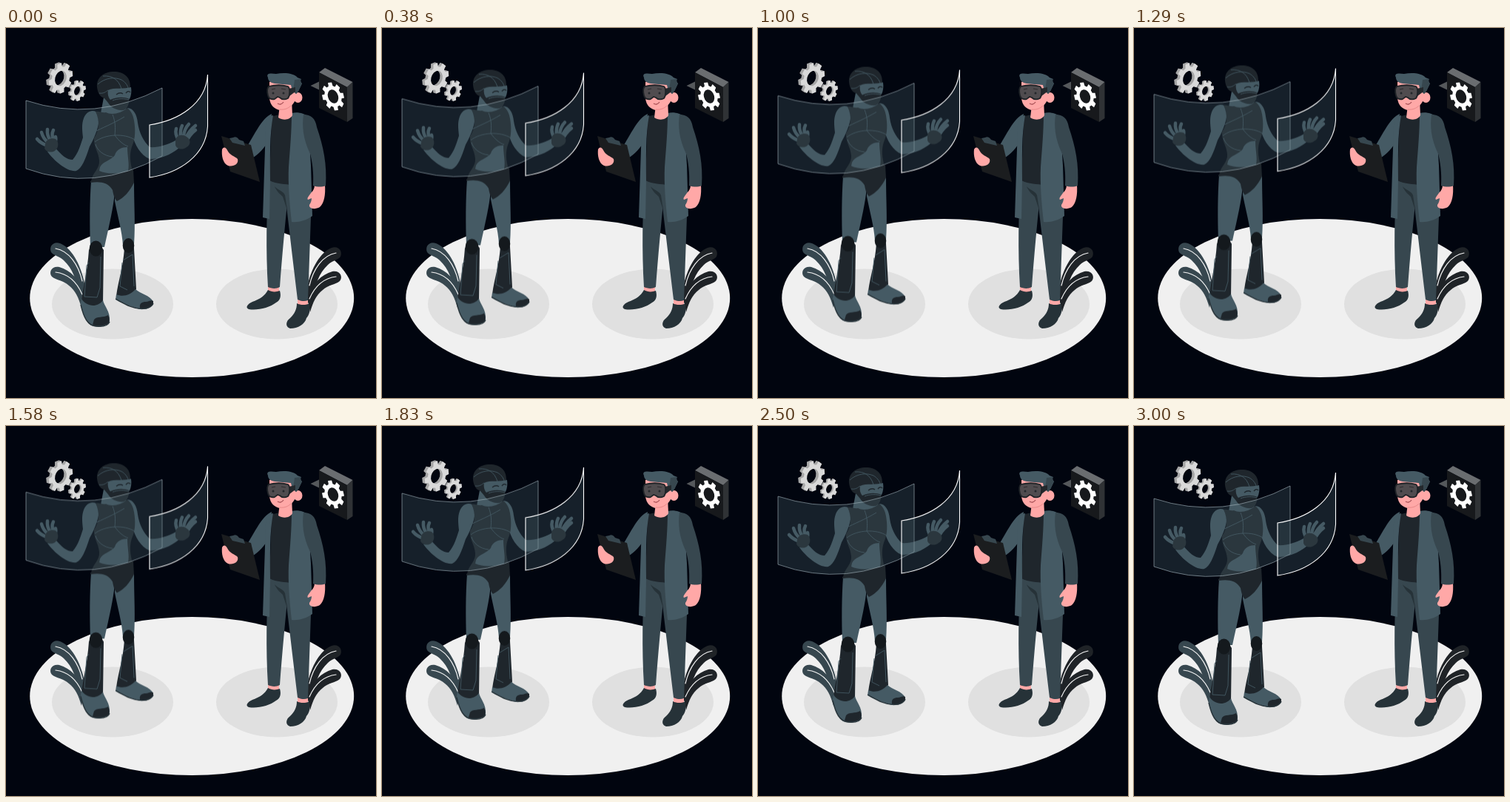
An HTML page for the animation above (3040 ms loop, 500 px wide and 500 px high).

```html
<!DOCTYPE html>
<html lang="en">
<head>
<meta charset="utf-8">
<title>Floating robot and engineer</title>
<style>
html,body{margin:0;width:100%;height:100%;overflow:hidden;background:#01050f}
svg{display:block;width:100vw;height:100vh}
.slate{fill:#455a64}
.steel{fill:#37474f}
.dark{fill:#1f262c}
.ink{fill:#14191d}
.shoe{fill:#263238}
.skin{fill:#ffa8a7}
.line{fill:none;stroke:#455a64;stroke-width:.9;stroke-linejoin:round}
.vein{fill:none;stroke:#f4f4f4;stroke-width:1.2;stroke-linecap:round}
.finger{fill:none;stroke:#455a64;stroke-width:4.5;stroke-linecap:round}
.sole{fill:none;stroke:#263238;stroke-width:1.4}
.glass{fill:#455a64;fill-opacity:.32}
</style>
</head>
<body>
<svg viewBox="0 0 500 500" xmlns="http://www.w3.org/2000/svg">
<defs>
  <g id="plant">
    <path d="M106 345C101 318 87 296 73 291C63 288 58 296 61 303C65 308 72 308 78 314C90 325 96 342 99 362L106 366Z"/>
    <path d="M106 358C99 340 87 327 72 323C62 321 57 330 62 336C68 341 78 341 85 348C94 355 98 364 102 378Z"/>
    <path class="vein" d="M67 298C85 301 98 320 103 342M67 330C84 332 96 344 103 360"/>
  </g>
</defs>

<ellipse cx="251.200" cy="365" rx="219" ry="107" fill="#f0f0f0"/>
<g fill="#e0e0e0">
  <ellipse cx="144" cy="373" rx="82" ry="47.5"/>
  <ellipse cx="366" cy="373" rx="82" ry="47.5"/>
</g>
<use href="#plant" fill="#37474f"/>
<use href="#plant" fill="#1f2327" transform="matrix(-1 0 0 1 513 6)"/>

<g id="gears"></g>

<!-- gear sign -->
<path fill="#55585b" d="M411.500 78L424 72V84Z"/>
<path fill="#6a6d70" d="M423 60L431 54L468.500 73L461 80Z"/>
<path fill="#2f3235" d="M461 80L468.500 73V122L461 127Z"/>
<path fill="#17191c" d="M423 60L461 80V127L423 108Z"/>
<g id="sign"></g>

<!-- engineer -->
<g>
  <path class="skin" d="M354 347H369V356C364 359 358 358 354 355ZM394 365H408V374C403 376 398 375 394 373Z"/>
  <path class="shoe" d="M354 354C359 357 365 357 370 355C372 362 371 368 365 371C356 378 340 382 328 380C323 378 326 373 333 370C342 367 350 362 354 354Z"/>
  <path class="shoe" d="M393 372C398 375 405 374 409 373C412 380 410 388 406 392C404 400 395 406 384 406C377 404 378 396 384 392C390 386 393 380 393 372Z"/>
  <path class="steel" d="M355 204L384 210L381 228C377 265 373 310 370 350C365 353 358 352 354 350C351 300 352 250 355 204Z"/>
  <path class="steel" d="M366 208L386 210L412 255L408 368C403 370 398 369 394 367C389 325 383 275 378 232Z"/>
  <path class="shoe" d="M363 214C368 220 375 220 377 226L380 246L374 228C370 224 366 221 363 214Z"/>
  <path class="slate" d="M359 116C346 122 338 140 327 158L333 176C342 170 350 161 355 152Z"/>
  <path class="dark" d="M359 120C366 116 380 118 389 117L387 212C377 211 366 211 356 206Z"/>
  <path class="slate" d="M361 118C355 119 352 123 351 132L347 256L356 258L357 206C357 175 356 145 361 118Z"/>
  <path class="slate" d="M386 115C394 113 403 115 408 120L412 186L414 254C406 260 395 263 386 262C383 235 381 210 382 188C384 161 386 140 386 115Z"/>
  <path class="skin" d="M417 212H431C432 225 430 237 424 242C417 246 409 244 410 239C412 236 413 233 413 230L408 232C406 230 410 226 412 223C415 220 417 217 417 212Z"/>
  <path class="steel" d="M402 117C412 117 418 122 420 134C429 160 434 185 432 213C427 215 421 215 415 213C416 196 414 181 411 170C401 149 400 132 402 117Z"/>
  <!-- head -->
  <path class="skin" d="M370 104L386 96L387 118C383 125 374 125 368 121Z"/>
  <path class="skin" d="M356 73C367 67 385 68 392 75L391 97C388 105 380 111 371 111C362 110 357 104 356 95Z"/>
  <ellipse class="skin" cx="394.500" cy="94" rx="6" ry="7"/>
  <path class="slate" d="M354 67C351 61 357 61 365 62C376 60 389 61 394 67L399 69C397 71 399 74 400 75C397 81 395 87 392 89L387 85L385 77C377 76 370 76 363 75C357 74 354 71 354 67Z"/>
  <path class="steel" d="M390 70L399 69C397 71 399 74 400 75C397 81 395 87 392 89L388 84Z"/>
  <path d="M382 82L391 80V86L383 92Z" fill="#24282c"/>
  <path d="M355 79C363 77 374 77 381 79C384 81 384 91 381 95C377 97 373 97 370 94L367 93L363 96C358 97 355 95 354 91C353 87 352 82 355 79Z" fill="#504c4f" stroke="#1f2327" stroke-width="1.800"/>
  <path d="M359 83L364 82M372 82L378 83" stroke="#302d30" stroke-width="1.200"/>
  <circle cx="361" cy="88" r="1.500" fill="#24282c"/><circle cx="375" cy="88" r="1.500" fill="#24282c"/>
  <path d="M367 102C370 104 373 103 375 100" fill="none" stroke="#a64f55" stroke-width="1.300"/>
  <path d="M370 110C377 111 382 108 385 105" fill="none" stroke="#e88889"/>
  <!-- clipboard -->
  <path d="M291 146L331 158L343 208L303 194Z" fill="#1b1d1f"/>
  <path class="steel" d="M302 149L307 148C310 146 313 148 315 151L321 153L323 159L306 155Z"/>
  <path class="skin" d="M292 164C294 160 297 161 299 165C302 172 309 173 313 177C315 184 307 188 300 186C293 183 291 172 292 164Z"/>
</g>

<!-- robot with glass screens -->
<g id="robot">
  <path class="slate" d="M147 229C160 226 168 218 173 207C173 240 175 265 173 292L158 294C157 275 151 255 147 234Z"/>
  <path class="slate" d="M115 207C126 202 141 207 147 222C145 243 140 264 133 296H114C113 265 113 235 115 207Z"/>
  <path class="dark" d="M160 298C164 290 170 290 173 298L176 353C170 362 158 365 149 362C152 340 158 325 160 298Z"/>
  <path class="slate" d="M149 360C158 364 168 361 175 353C181 359 195 361 199 370C200 377 190 381 180 380C168 376 154 371 148 367Z"/>
  <path class="dark" d="M181 378C180 372 184 370 189 370C193 370 196 367 199 369C200 376 190 380 181 379Z"/>
  <path class="sole" d="M148 366C159 372 171 380 183 379C190 380 197 377 199 372"/>
  <ellipse class="ink" cx="165.500" cy="294" rx="7.800" ry="10"/>
  <path class="line" d="M158 314L171 306L173 349M157 317L154 349L164 354"/>
  <path class="dark" d="M112 300C116 291 127 291 132 300L131 372C124 382 108 382 102 370C104 350 110 330 112 300Z"/>
  <path class="slate" d="M102 366C108 376 123 379 131 368C133 376 141 383 140 396C138 404 124 405 115 402C108 398 102 381 101 372Z"/>
  <path class="dark" d="M119 394C123 389 131 392 138 388C141 393 140 400 135 401C128 403 121 403 117 401Z"/>
  <path class="sole" d="M101 374C105 391 110 402 122 403C131 404 138 402 140 397"/>
  <ellipse class="ink" cx="121.500" cy="298" rx="8.800" ry="10.500"/>
  <path class="line" d="M112 317L109 321L106 363L123 364L127 351L128 309"/>

  <!-- arms -->
  <path class="slate" d="M164 108C172 108 177 117 178 128C180 142 186 153 194 161C205 162 218 158 229 152L234 162C222 172 208 177 194 177C182 172 174 158 171 145Z"/>
  <path class="finger" d="M233 151Q228 143 230 136M236 147Q235 138 238 132M240 146Q241 136 247 130M243 149Q247 139 256 132M243 155Q248 144 256 138"/>
  <path class="dark" d="M229 151C231 144 239 143 244 147C251 151 249 159 244 161C238 166 230 163 229 158Z"/>
  <path class="slate" d="M105 122C109 111 119 109 126 116C127 130 121 146 113 160C107 178 103 189 95 193C84 195 66 181 56 167L66 161C75 172 82 178 90 178C98 169 101 157 104 148C103 138 102 130 105 122Z"/>
  <path class="finger" d="M56 159Q47 156 42 150M57 155Q50 149 48 141M60 152Q55 145 56 137M64 151Q61 144 64 138M66 156Q68 151 67 147"/>
  <path class="dark" d="M53 157C54 150 62 148 67 150C72 154 71 162 67 165C62 170 53 167 52 162Z"/>

  <!-- torso -->
  <path class="slate" d="M132 94L160 103L164 113L151 122L128 115Z"/>
  <path class="dark" d="M121 113C126 112 130 115 135 114C142 118 155 116 164 108C170 113 172 119 173 125C175 136 175 149 171 158C168 165 167 174 169 185L172 201L115 207C117 195 127 190 126 179C125 167 118 160 119 149C126 138 127 125 121 113Z"/>
  <path class="slate" d="M164 161C157 161 149 164 147 172C142 179 131 180 127 188L126 193C136 198 154 197 165 193C167 183 164 174 164 161Z"/>
  <path class="dark" d="M114 207C125 198 155 200 172 191L173 209C167 221 160 229 150 234C146 230 145 224 144 219C138 208 126 207 114 209Z"/>
  <path class="line" d="M144 117C148 127 148 135 147 145M120 154C134 143 160 142 174 151M121 157C123 165 132 173 144 174M147 145C153 153 159 158 165 160M118 141C130 135 145 129 160 120"/>

  <!-- head -->
  <path class="dark" d="M123 80C122 67 132 59 146 59C159 59 168 66 168 79L167 95C166 104 164 109 159 111C151 112 142 108 138 101L133 95C127 93 124 88 123 80Z"/>
  <path class="slate" d="M138 84C146 80 160 83 169 80C170 86 169 92 167 96C158 92 147 94 141 97C138 94 137 88 138 84Z"/>
  <path class="line" d="M124 76C134 67 147 66 156 70C161 73 164 77 165 81M131 65C143 64 152 69 156 82M126 88C132 89 135 86 138 84M144 98C151 95 160 95 166 97"/>
  <path d="M149 90Q154 86 158 89M162 88Q165 84 168 87" fill="none" stroke="#1f272d" stroke-width="1.300"/>

  <path class="glass" stroke="#a9b8c0" stroke-opacity=".62" d="M27 98Q120 128.500 211 81V173Q120 223.500 27 190Z"/>
  <path class="glass" stroke="#fff" stroke-width="1.100" d="M194 131C233 125 270 103 272.500 63V133C270 172 235 196 194 202Z"/>
</g>
</svg>
<script>
// Toothed ring: outer radius r, hole radius h
function gearPath(r, h, teeth = 8) {
  const pts = [];
  for (let i = 0; i < teeth; i++)
    for (const [k, q] of [[-.33, .76], [-.22, 1], [.22, 1], [.33, .76]]) {
      const a = (i + k) / teeth * 2 * Math.PI;
      pts.push((Math.cos(a) * r * q).toFixed(2) + ' ' + (Math.sin(a) * r * q).toFixed(2));
    }
  return `M${pts.join('L')}ZM${h} 0A${h} ${h} 0 1 0 ${-h} 0A${h} ${h} 0 1 0 ${h} 0Z`;
}

function gear(x, y, r, h, tilt, color) {
  return `<path fill="${color}" fill-rule="evenodd" d="${gearPath(r, h)}"
    transform="translate(${x} ${y}) rotate(${tilt}) scale(.72 1) rotate(12)"/>`;
}

function solidGear(x, y, r, h, depth) {
  let out = '';
  for (let d = depth; d > 0; d -= .5) out += gear(x - d, y - d * .3, r, h, 20, '#a6a6a6');
  return out + gear(x, y, r, h, 20, '#d9d9d9');
}

document.getElementById('gears').innerHTML =
  solidGear(74, 68, 21.5, 10.5, 3.5) + solidGear(97, 85, 14.5, 6.5, 2);
document.getElementById('sign').innerHTML = gear(442, 92.5, 19.8, 9.5, -22, '#fff');

const floatSteps = [[0, 0], [1450, -9.5], [2980, 0], [3040, 0]];
document.getElementById('robot').animate(
  floatSteps.map(([t, y]) => ({ offset: t / 3040, transform: `translateY(${y}px)` })),
  { duration: 3040, iterations: Infinity, easing: 'linear' }
);
</script>
</body>
</html>
```
